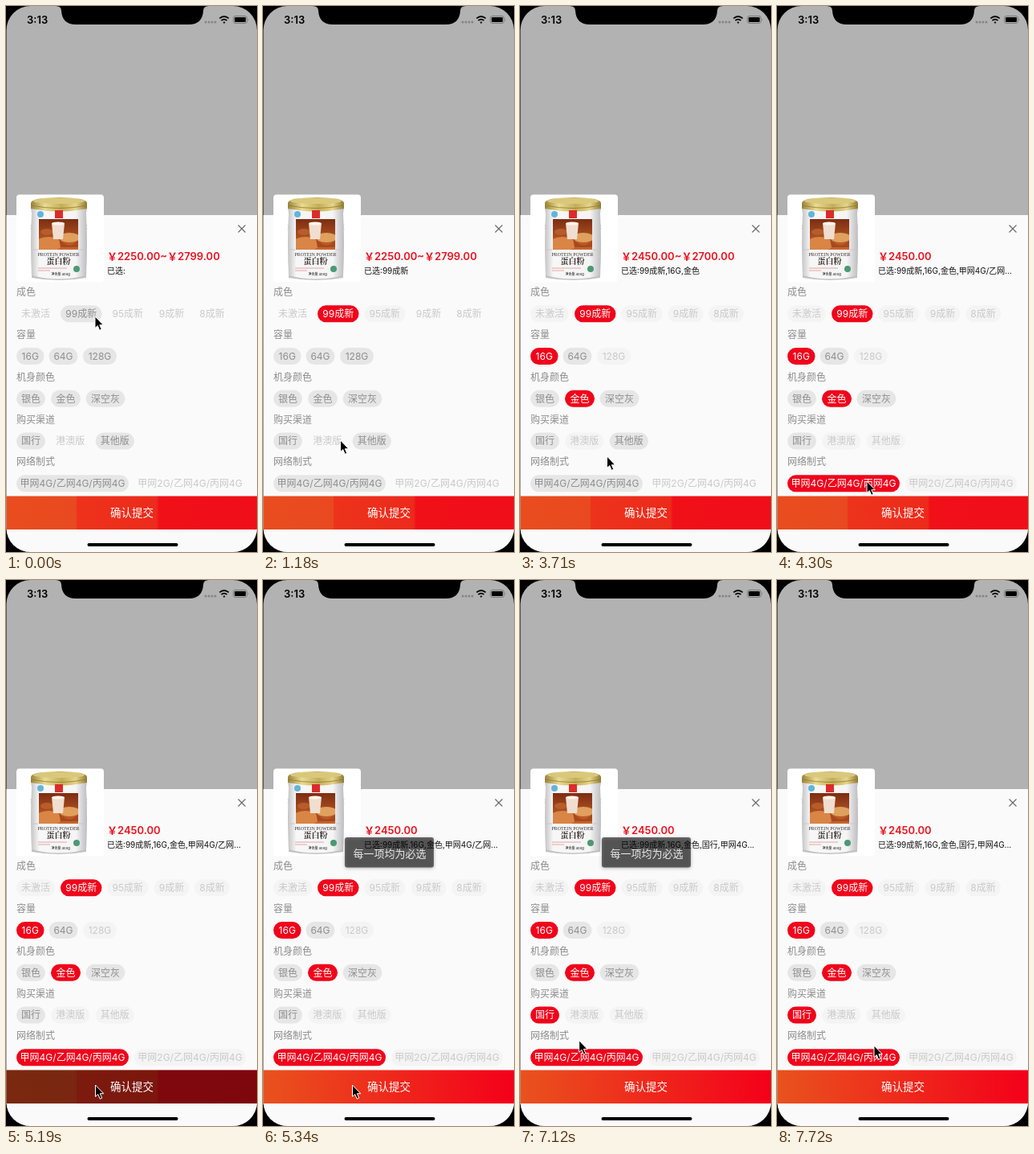
Animation of 313x679 px, one loop 8000 ms. Source, as an HTML page:

```html
<!DOCTYPE html>
<html lang="zh-CN">
<head>
<meta charset="utf-8">
<style>
  html, body { margin: 0; width: 100%; height: 100%; overflow: hidden; background: #000; }
  svg { display: block; width: 100%; height: 100%; }
  text { font-family: Inter, "Noto Sans CJK SC", "Noto Sans CJK", sans-serif; font-size: 12px; }
  .mid { text-anchor: middle; }
  .serif { font-family: "Liberation Serif", "Noto Serif CJK SC", "Noto Sans CJK SC", serif; fill: #3a3030; }
</style>
</head>
<body>
<svg viewBox="0 0 313 679" preserveAspectRatio="none">
  <defs>
    <clipPath id="screen"><rect x=".5" width="312.5" height="679" rx="30"/></clipPath>
    <clipPath id="photo"><rect x="41" y="265" width="49" height="38"/></clipPath>
    <linearGradient id="smooth"><stop stop-color="#e9521e"/><stop offset="1" stop-color="#f4001a"/></linearGradient>
    <linearGradient id="banded">
      <stop stop-color="#e94d1f"/><stop offset=".28" stop-color="#e94920"/>
      <stop offset=".28" stop-color="#ed331b"/><stop offset=".6" stop-color="#ed2a1b"/>
      <stop offset=".61" stop-color="#f01018"/><stop offset="1" stop-color="#f00e18"/>
    </linearGradient>
    <linearGradient id="gold">
      <stop stop-color="#9a8438"/><stop offset=".25" stop-color="#eadb92"/><stop offset=".55" stop-color="#c4ad58"/>
      <stop offset=".8" stop-color="#e6d58a"/><stop offset="1" stop-color="#927b32"/>
    </linearGradient>
    <linearGradient id="tin">
      <stop stop-color="#c4c4c6"/><stop offset=".15" stop-color="#f7f7f7"/><stop offset=".8" stop-color="#f5f5f5"/>
      <stop offset="1" stop-color="#bdbdc0"/>
    </linearGradient>
    <linearGradient id="food" x2="0" y2="1"><stop stop-color="#7d2d12"/><stop offset="1" stop-color="#c9662c"/></linearGradient>
  </defs>

  <g clip-path="url(#screen)">
    <rect width="313" height="679" fill="#b2b2b2"/>
    <rect y="260" width="313" height="419" fill="#fafafa"/>
    <path d="M62 0Q69 0 69 6Q70 23 87 23H228Q245 23 246 6Q246 0 253 0Z"/>
    <text x="26" y="22" style="font-size:13px;font-weight:600">3:13</text>
    <g fill="#858585">
      <circle cx="249" cy="20" r="1.5"/><circle cx="253" cy="20" r="1.5"/>
      <circle cx="257" cy="20" r="1.5"/><circle cx="261" cy="20" r="1.5"/>
    </g>
    <g fill="none" stroke="#000" stroke-width="1.8">
      <path d="M266.3 15.4Q272 10.6 277.7 15.4M268.5 18Q272 15.2 275.5 18"/>
      <path d="M272 21.5l-1-1.4h2z" stroke-width="1"/>
      <rect x="283.5" y="12.5" width="17" height="9" rx="2.6" stroke="#777" stroke-width="1"/>
    </g>
    <rect x="285" y="14" width="14" height="6" rx="1.3"/>
    <path d="M302 15.5q1.5 1.5 0 3z" fill="#777"/>

    <rect x="13" y="234.500" width="109" height="109" rx="4" fill="#fff"/>
    <path d="M31 251Q66 258 101 251L100 258Q102 294 100 336Q66 345 32 336Q30 294 32 258Z" fill="url(#tin)"/>
    <path d="M31 272q2 3 0 6M101 272q-2 3 0 6M32 303H40M91 303H100" fill="none" stroke="#c8c8c8"/>
    <path d="M32 335Q66 344 100 335V338Q66 344 32 338Z" fill="#c2c2c4"/>
    <path d="M31 245Q32 238 66 238Q100 238 101 245V252Q66 259 31 252Z" fill="url(#gold)"/>
    <ellipse cx="66" cy="242.500" rx="32" ry="3.600" fill="#d9c87c"/>
    <path d="M31 248Q66 255 101 248" fill="none" stroke="#8e7930" stroke-width=".8"/>
    <rect x="61" y="254" width="10" height="10" fill="#dc2b2b"/>
    <circle cx="43" cy="259" r="4" fill="#62b4dc"/>
    <g clip-path="url(#photo)">
      <rect x="41" y="265" width="49" height="38" fill="url(#food)"/>
      <ellipse cx="53" cy="296" rx="17" ry="9" fill="#d98545"/>
      <ellipse cx="79" cy="288" rx="13" ry="6" fill="#e0a05e"/>
      <path d="M66 289Q79 306 92 289V300H68Z" fill="#a8481e"/>
      <ellipse cx="51" cy="281" rx="8" ry="4" fill="#b85c2a"/>
      <path d="M57 270H73L71 290H59Z" fill="#f0ded0"/>
      <ellipse cx="65" cy="270.500" rx="8" ry="2" fill="#fff4e8"/>
    </g>
    <text class="serif mid" x="65.500" y="310.500" style="font-size:6px">PROTEIN POWDER</text>
    <text class="serif mid" x="65.500" y="321" style="font-size:10px;font-weight:600">蛋白粉</text>
    <path d="M40 326H76M40 329H55" stroke="#e3a6a2"/>
    <text class="mid" x="68" y="335" style="font-size:4px">净含量:400g</text>
    <circle cx="88" cy="327" r="4" fill="#4c9a72"/>

    <path d="M289.500 272.500l9 9m0-9l-9 9" stroke="#666" stroke-width="1.100"/>
    <text id="price" x="126" y="315.500" fill="#ea121f" style="font-size:13px;font-weight:600"></text>
    <text id="chosen" x="126" y="332.700" fill="#111" style="font-size:10px"></text>
    <g id="options"></g>

    <rect id="button" y="609.500" width="313" height="41.500"/>
    <rect id="pressed" y="609.500" width="313" height="41.500" fill-opacity=".48"/>
    <text class="mid" x="157" y="635" fill="#fff" style="font-size:13.5px">确认提交</text>
    <rect x="101.500" y="668" width="113" height="4" rx="2"/>

    <g id="toast">
      <rect x="102" y="320" width="111" height="37.500" rx="3" fill-opacity=".55"
        style="filter:drop-shadow(0 1px 2px rgba(0,0,0,.5))"/>
      <text class="mid" x="158" y="344.500" fill="#e8e8e8" style="font-size:13px">每一项均为必选</text>
    </g>
    <path id="cursor" d="M0 0V14.500L3.300 11.600L5.700 17.300L8.200 16.200L5.800 10.700H10.300Z" stroke="#fff"/>
  </g>
</svg>
<script>
const LOOP = 8000, TICK = 148.4, NEVER = 999;
const $ = id => document.getElementById(id);

function add(tag, attrs, content = '') {
  const el = document.createElementNS('http://www.w3.org/2000/svg', tag);
  for (const key in attrs) el.setAttribute(key, attrs[key]);
  el.textContent = content;
  $('options').append(el);
  return el;
}

// Ticks at which an option is picked, becomes unavailable, and shows its pale pill.
const option = (label, x, width, { pick = NEVER, off = NEVER, pale = off } = {}) =>
  ({ label, x, width, pick, off, pale });

const groups = [
  ['成色', [
    option('未激活', 13, 48, { off: 0, pale: 15 }),
    option('99成新', 68, 51.5, { pick: 2 }),
    option('95成新', 126, 51.5, { off: 0, pale: 2 }),
    option('9成新', 184.5, 44, { off: 0, pale: 13 }),
    option('8成新', 235, 44, { off: 0, pale: 13 })]],
  ['容量', [
    option('16G', 13, 34.5, { pick: 19 }),
    option('64G', 53.5, 36, {}),
    option('128G', 96, 42, { off: 13 })]],
  ['机身颜色', [
    option('银色', 13, 36),
    option('金色', 56, 37, { pick: 13 }),
    option('深空灰', 99.5, 49)]],
  ['购买渠道', [
    option('国行', 13, 36, { pick: 45 }),
    option('港澳版', 56, 48.5, { off: 0, pale: 12 }),
    option('其他版', 111.5, 48.5, { off: 28 })]],
  ['网络制式', [
    option('甲网4G/乙网4G/丙网4G', 13, 140, { pick: 28 }),
    option('甲网2G/乙网4G/丙网4G', 160, 139, { off: 0, pale: 28 })]]
];

const chips = groups.flatMap(([title, items], row) => {
  const y = 372.3 + row * 52.75;
  add('text', { x: 13, y: y - 12, fill: '#8c8c8c' }, title);
  return items.map(item => ({
    ...item,
    pill: add('rect', { x: item.x, y, width: item.width, height: 21, rx: 10.5 }),
    text: add('text', { x: item.x + item.width / 2, y: y + 14.8, class: 'mid' }, item.label)
  }));
});

const prices = [[0, '￥2250.00~￥2799.00'], [13, '￥2450.00~￥2700.00'], [28, '￥2450.00']];
const summaries = [
  [0, ''], [2, '99成新'], [13, '99成新,金色'], [19, '99成新,16G,金色'],
  [28, '99成新,16G,金色,甲网4G/乙网...'], [45, '99成新,16G,金色,国行,甲网4G...']
];
const latest = (steps, tick) => steps.filter(([at]) => at <= tick).pop()[1];

// Pointer path: tick, x, y
const path = [
  [0, 111, 386], [1, 111, 386], [4, 109, 386], [5, 109, 386], [7, 102, 505], [8, 96.5, 540], [9, 93, 550],
  [12, 73, 481], [14, 73, 481], [17, 45, 438], [19, 32, 433], [21, 32, 433],
  [23, 64, 495], [25, 108.5, 560], [27, 112, 591], [32, 112, 591],
  [35, 111.5, 628], [39, 111.5, 628], [43, 37, 542], [46, 37, 542],
  [49, 92, 588], [50, 108, 590], [52, 121, 579], [60, 121, 579]
];

function pointer(tick) {
  const i = path.findIndex(([at]) => at > tick);
  const [t0, x0, y0] = path[i - 1], [t1, x1, y1] = path[i];
  const p = (tick - t0) / (t1 - t0);
  return [x0 + (x1 - x0) * p, y0 + (y1 - y0) * p];
}

const show = (id, visible) => $(id).setAttribute('visibility', visible ? 'visible' : 'hidden');

function draw(tick) {
  for (const { pill, text, pick, off, pale } of chips) {
    const picked = tick >= pick, disabled = tick >= off;
    pill.setAttribute('fill', picked ? '#f0051b' : !disabled ? '#e6e6e6' : tick >= pale ? '#f4f4f4' : 'none');
    text.setAttribute('fill', picked ? '#fff' : disabled ? '#c9c9c9' : '#8e8e8e');
  }
  $('price').textContent = latest(prices, tick);
  $('chosen').textContent = '已选:' + latest(summaries, tick);
  $('button').setAttribute('fill', tick < 36 ? 'url(#banded)' : 'url(#smooth)');
  show('pressed', tick >= 35 && tick < 36);
  show('toast', tick >= 36 && tick < 49);
  $('cursor').setAttribute('transform', `translate(${pointer(tick)})`);
}

function frame() {
  draw(Math.floor((performance.now() % LOOP + 14) / TICK));
  requestAnimationFrame(frame);
}
frame();
</script>
</body>
</html>
```
